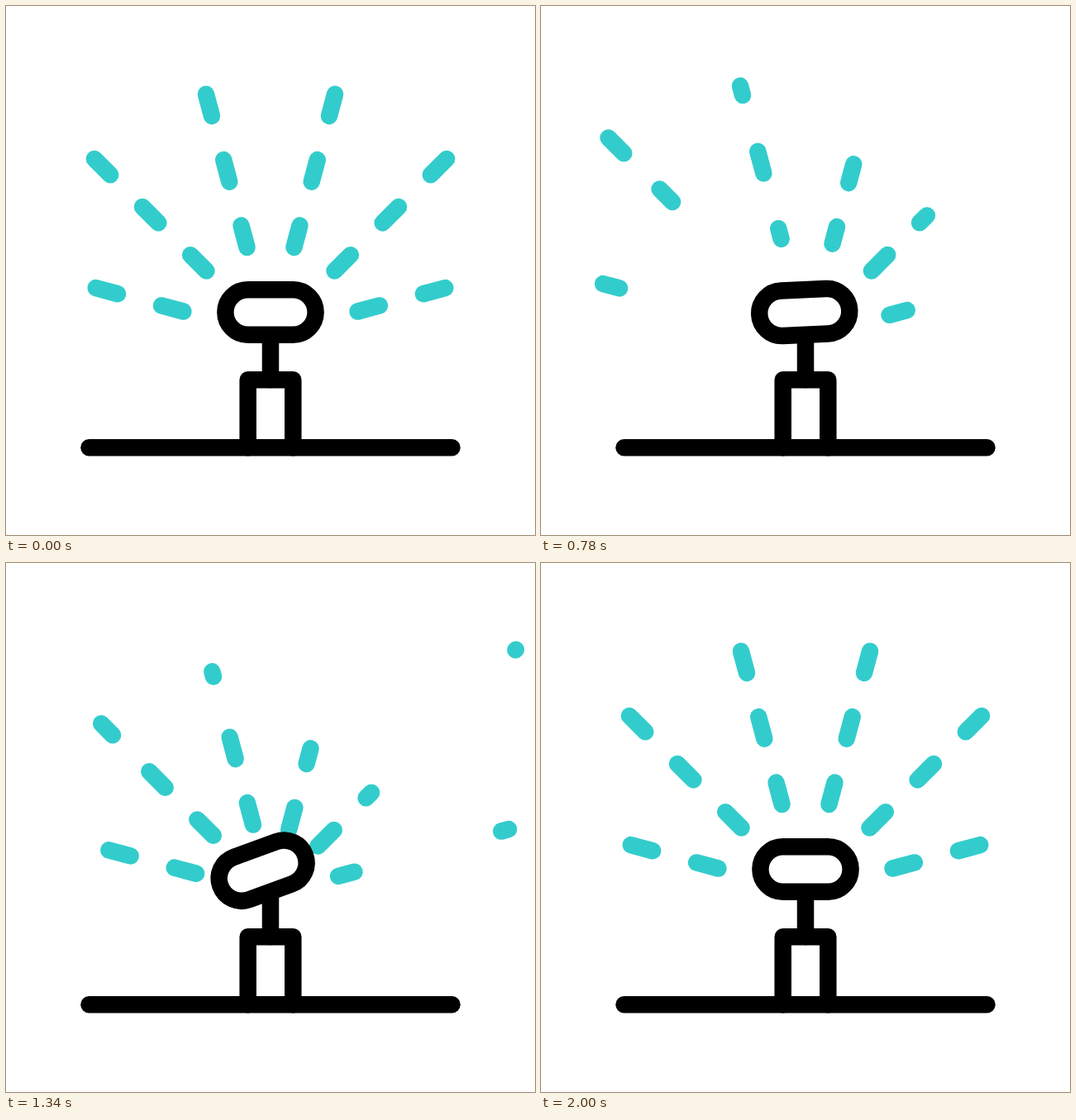
Animation of 640 by 640 pixels, one loop 2.4 s. Source, as an HTML page with a canvas:

```html
<!DOCTYPE html>
<html lang="en">
<head>
<meta charset="utf-8">
<title>Sprinkler</title>
<style>
html, body { margin: 0; width: 100%; height: 100%; overflow: hidden; background: #fff; }
canvas { display: block; width: 640px; height: 640px; }
</style>
</head>
<body>
<canvas id="stage" width="640" height="640"></canvas>
<script>
const ctx = document.getElementById('stage').getContext('2d');
const LOOP = 2400, STEP = 20, DASH = 27.4, PITCH = 82.2;
const SECOND = 600, THIRD = 1175;

// Jets from left to right.
// pos: angle, x, y, dashes
// out: first burst end time, travel, drift
// grow: time a new burst takes to unroll
// fade: second burst fade start and end
// move: second burst travel from/to, drift from/to
// back: third burst start travel, end time, start drift
const jets = [
  { pos: [165, 214.5, 369.5, 2], out: [180, 87, 0], grow: 140, fade: [665, 850], move: [-33, 69, -3.8, -3.8], back: [-34, 1500, -4] },
  { pos: [135, 242.5, 320.5, 3], out: [241, 84, 1.7], grow: 182, fade: [690, 915], move: [-35, 89, 0, 0], back: [-33, 1440, -2] },
  { pos: [105, 291.6, 292, 3], out: [293, 98, 2.4], grow: 222, fade: [719, 1070], move: [-34, 81, 1.5, 2], back: [-40, 1635, 1.2] },
  { pos: [75, 348.4, 292, 3], out: [360, 110, 2.2], grow: 290, fade: [746, 1200], move: [-41.5, 94, 3.5, 1.2], back: [-44.6, 1716, 2.8] },
  { pos: [45, 397.5, 320.5, 3], out: [420, 143, 2.5], grow: 370, fade: [794, 1345], move: [-35, 117, 1.4, 2.5], back: [-40, 1815, 1.7] },
  { pos: [15, 425.5, 369.5, 2], out: [481, 109, 0.8], grow: 448, fade: [858, 1439], move: [-32, 94, 3.7, 1.2], back: [-32, 1940, 3.8] }
];

const tilt = [[0, 0], [330, 20], [600, -20], [1005, 19.1], [1340, -20], [1700, 0]];

const frac = (t, a, b) => Math.min(1, Math.max(0, (t - a) / (b - a)));
const mix = (a, b, k) => a + (b - a) * k;

function tiltAt(t) {
  for (let i = 1; i < tilt.length; i++) {
    const [t0, v0] = tilt[i - 1], [t1, v1] = tilt[i];
    if (t <= t1) return mix(v0, v1, frac(t, t0, t1));
  }
  return 0;
}

function line(...pts) {
  ctx.beginPath();
  for (let i = 0; i < pts.length; i += 2) ctx.lineTo(pts[i], pts[i + 1]);
  ctx.stroke();
}

// Draws the part from..to (0..1) of all dashes laid end to end.
function burst([angle, x, y, count], from, to, travel, drift) {
  if (to <= from) return;
  const r = angle * Math.PI / 180, c = Math.cos(r), s = Math.sin(r);
  const total = count * DASH;
  for (let i = 0; i < count; i++) {
    let a = Math.max(0, from * total - i * DASH);
    let b = Math.min(DASH, to * total - i * DASH);
    if (b <= a) continue;
    if (angle > 90) [a, b] = [DASH - b, DASH - a];
    const px = x + drift * s, py = y + drift * c;
    const d0 = travel + i * PITCH + a, d1 = travel + i * PITCH + b;
    line(px + c * d0, py - s * d0, px + c * d1, py - s * d1);
  }
}

function drawJet(j, t) {
  const [end, far, side] = j.out;
  const k1 = frac(t, 0, end);
  if (t < end) burst(j.pos, 0, 1 - k1, far * k1, side * k1);

  if (t > SECOND && t < j.fade[1]) {
    const k = frac(t, SECOND, j.fade[1]), [p0, p1, q0, q1] = j.move;
    burst(j.pos, frac(t, ...j.fade), frac(t, SECOND, SECOND + j.grow), mix(p0, p1, k), mix(q0, q1, k));
  }

  if (t > THIRD) {
    const [p0, stop, q0] = j.back, k = frac(t, THIRD, stop);
    burst(j.pos, 0, frac(t, THIRD, THIRD + j.grow), p0 * (1 - k), q0 * (1 - k));
  }
}

function drawBody(t) {
  line(100.5, 534.2, 539.5, 534.2);
  line(292.7, 534.2, 292.7, 452.3, 347.3, 452.3, 347.3, 534.2);
  line(320, 399, 320, 452);

  ctx.save();
  ctx.translate(320, 397.8);
  ctx.rotate(tiltAt(t) * Math.PI / 180);
  ctx.beginPath();
  ctx.arc(-27.3, -27.3, 27.3, Math.PI / 2, Math.PI * 1.5);
  ctx.arc(27.3, -27.3, 27.3, -Math.PI / 2, Math.PI / 2);
  ctx.closePath();
  ctx.stroke();
  ctx.restore();
}

function frame(now) {
  const t = Math.floor((now % LOOP) / STEP) * STEP;
  ctx.fillStyle = '#fff';
  ctx.fillRect(0, 0, 640, 640);
  ctx.lineWidth = 20.5;
  ctx.lineCap = ctx.lineJoin = 'round';
  ctx.strokeStyle = '#33cccc';
  for (const j of jets) drawJet(j, t);
  ctx.strokeStyle = '#000';
  drawBody(t);
}

const start = performance.now();
function tick() {
  frame(performance.now() - start);
  requestAnimationFrame(tick);
}
tick();
</script>
</body>
</html>
```
